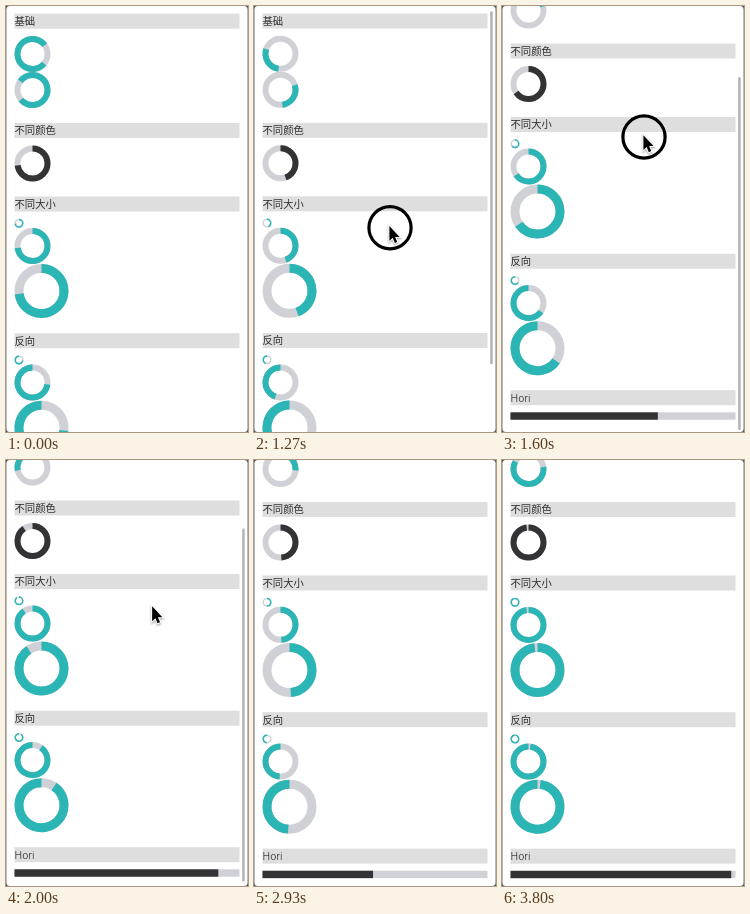
Recreate the animation shown at these times as an HTML page with a canvas. Size 242 px wide and 426 px high, loop 3870 ms.

```html
<!DOCTYPE html>
<html lang="zh">
<head>
<meta charset="utf-8">
<style>
  html, body { margin: 0; width: 100%; height: 100%; overflow: hidden; background: #fff; }
  canvas { display: block; width: 242px; height: 426px; }
</style>
</head>
<body>
<canvas id="stage"></canvas>
<script>
const W = 242, H = 426, LOOP = 3870, STEP = 200 / 3;
const LEFT = 8.5, WIDTH = 225;
const TEAL = '#2bb5b5', DARK = '#333335', TRACK = '#d0d1d6', TITLE = '#dedede';
const APPEAR = 330, PRESS = 500, DRAG = 1266, RELEASE = 1670, LEAVE = 2600, MAX_SCROLL = 75;

const canvas = document.getElementById('stage');
const ctx = canvas.getContext('2d');
const dpr = window.devicePixelRatio || 1;
canvas.width = W * dpr;
canvas.height = H * dpr;

const clamp01 = v => Math.max(0, Math.min(1, v));
const ramp = (t, from, to) => clamp01((t - from) / (to - from));
const mix = (a, b, k) => a + (b - a) * k;

// Fills up every 1.7 s, a little faster while the page is being scrolled.
function progress(t) {
  return (.73 + .000565 * t + .104 * ramp(t, 1267, 2933)) % 1;
}

// One turn in 1.4 s while the arc slowly shrinks and grows again.
function spinner(t) {
  const middle = 272 + 360 * t / 1400;
  const half = (70 + 215 * Math.cos(Math.PI * t / 4400) ** 4) / 2;
  return [middle - half, middle + half];
}

function pointer(t) {
  const enter = ramp(t, APPEAR, 530), settle = ramp(t, 530, DRAG);
  const drag = ramp(t, DRAG, 1600), leave = ramp(t, RELEASE, 2400);
  return {
    x: mix(128, 142, enter) - 6 * settle + 6 * drag + 10.5 * leave,
    y: mix(20, 228, enter) - 6 * settle - 91 * drag + 38 * leave
  };
}

// The page follows the pointer, stretches past its end and springs back.
function scrollAt(t) {
  if (t < DRAG) return 0;
  const pull = 222 - pointer(Math.min(t, RELEASE)).y;
  const stretch = Math.max(0, pull - MAX_SCROLL) * .28;
  const spring = Math.exp(-Math.max(0, t - RELEASE) / 300);
  return Math.min(pull, MAX_SCROLL) + stretch * spring;
}

function arc(y, radius, color, from, to) {
  const width = radius / 3, rad = Math.PI / 180;
  ctx.beginPath();
  ctx.arc(LEFT + radius, y, radius - width / 2, (from - 90) * rad, (to - 90) * rad);
  ctx.lineWidth = width;
  ctx.strokeStyle = color;
  ctx.stroke();
}

function ring(y, radius, color, from, to) {
  arc(y, radius, TRACK, 0, 360);
  arc(y, radius, color, from, to);
}

function title(text, y) {
  ctx.fillStyle = TITLE;
  ctx.fillRect(LEFT, y, WIDTH, 15);
  ctx.fillStyle = '#2c2c2c';
  ctx.fillText(text, LEFT, y + 11.4);
}

function page(t) {
  const p = progress(t), [tail, head] = spinner(t);
  ctx.font = '300 10.35px Inter, "Noto Sans CJK SC", "Noto Sans CJK", sans-serif';

  title('基础', 7.7);
  ring(48, 18, TEAL, tail, head);
  ring(84, 18, TEAL, -head, -tail);

  title('不同颜色', 117);
  ring(157.5, 18, DARK, 0, 360 * p);

  title('不同大小', 190.5);
  title('反向', 327.2);
  let offset = 0;
  for (const radius of [4.5, 18, 27]) {
    ring(212.8 + offset + radius, radius, TEAL, 0, 360 * p);
    ring(349.5 + offset + radius, radius, TEAL, -360 * p, 0);
    offset += 2 * radius + .1;
  }

  title('Hori', 463.7);
  ctx.fillStyle = TRACK;
  ctx.fillRect(LEFT, 485.8, WIDTH, 7.4);
  ctx.fillStyle = DARK;
  ctx.fillRect(LEFT, 485.8, WIDTH * p, 7.4);
}

function scrollbar(t, scroll) {
  const alpha = ramp(t, 1170, 1250) - ramp(t, 2430, 2660);
  ctx.fillStyle = `rgba(0, 0, 0, ${.3 * alpha})`;
  ctx.beginPath();
  ctx.roundRect(236.2, 5 + scroll * .83, 2.5, 353, 1.2);
  ctx.fill();
}

function cursor(t) {
  if (t < APPEAR || t > LEAVE) return;
  const { x, y } = pointer(t);
  ctx.save();
  ctx.translate(x, y);
  if (t > PRESS && t < RELEASE) {
    ctx.beginPath();
    ctx.arc(0, 0, 21.1, 0, 2 * Math.PI);
    ctx.lineWidth = 3.2;
    ctx.strokeStyle = '#000';
    ctx.stroke();
  }
  ctx.translate(-.6, -.8);
  ctx.scale(1.05, 1.05);
  const arrow = new Path2D('M0 -1V13.2L3.1 10.3L5.2 15.2L7.5 14.2L5.4 9.4H9.7Z');
  ctx.lineWidth = 2;
  ctx.strokeStyle = '#fff';
  ctx.shadowColor = 'rgba(0, 0, 0, .4)';
  ctx.shadowBlur = 2 * dpr;
  ctx.shadowOffsetY = dpr;
  ctx.stroke(arrow);
  ctx.shadowColor = 'transparent';
  ctx.fillStyle = '#000';
  ctx.fill(arrow);
  ctx.restore();
}

function draw(now) {
  const frame = Math.min(57, Math.floor((now % LOOP + 5) / STEP));
  const t = frame * STEP, scroll = scrollAt(t);
  ctx.setTransform(dpr, 0, 0, dpr, 0, 0);
  ctx.fillStyle = '#555';
  ctx.fillRect(0, 0, W, H);
  ctx.save();
  ctx.beginPath();
  ctx.roundRect(.4, 0, W - .8, H, 3.5);
  ctx.clip();
  ctx.fillStyle = '#fff';
  ctx.fillRect(0, 0, W, H);
  ctx.save();
  ctx.translate(0, -scroll);
  page(t);
  ctx.restore();
  scrollbar(t, scroll);
  cursor(t);
  ctx.restore();
}

const start = performance.now();
function tick() {
  draw(performance.now() - start);
  requestAnimationFrame(tick);
}
tick();
</script>
</body>
</html>
```
